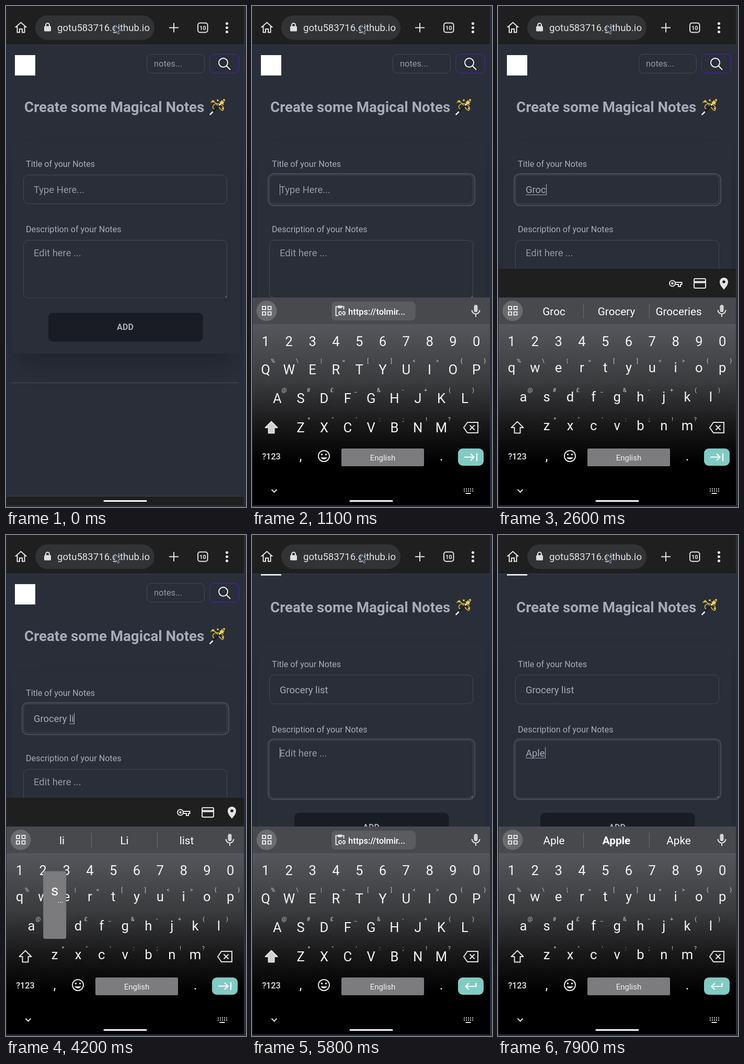
An HTML page that plays this animation: 459x959 px, repeating every 8000 ms.

```html
<!DOCTYPE html>
<html lang="en">
<head>
<meta charset="utf-8">
<title>Magical Notes</title>
<style>
html, body { margin: 0; width: 100%; height: 100%; overflow: hidden; background: #263040; }
svg { display: block; width: 459px; height: 959px; }
text { font-family: Roboto, "Noto Sans", sans-serif; white-space: pre; }
.mid { text-anchor: middle; }
.line { fill: none; stroke: #e4e4e4; stroke-width: 2; }
.box { fill: none; stroke: #434955; }
.ring { fill: none; stroke: #474d59; stroke-width: 2; }
.page text { fill: #a6abb8; }
.page .hint { fill: #9299a5; }
.label { font-size: 16.15px; }
.field { font-size: 18.4px; }
.keys { font-size: 25.6px; fill: #f2f2f2; text-anchor: middle; }
.alt { font-size: 11px; fill: #c9c9c9; text-anchor: end; }
.word { font-size: 20.7px; fill: #fff; text-anchor: middle; }
</style>
</head>
<body>
<svg viewBox="0 0 459 959">
  <defs>
    <linearGradient id="fade" gradientUnits="userSpaceOnUse" x1="0" y1="609" x2="0" y2="875">
      <stop offset="0" stop-color="#55575c"/>
      <stop offset=".42" stop-color="#3a3b3d"/>
      <stop offset=".72" stop-color="#19191a"/>
      <stop offset="1" stop-color="#000"/>
    </linearGradient>
    <filter id="blur" filterUnits="userSpaceOnUse" x="-80" y="180" width="620" height="640">
      <feGaussianBlur stdDeviation="27"/>
    </filter>
  </defs>

  <rect width="459" height="959" fill="#263040"/>
  <rect x="1" y="74" width="454" height="883" fill="#2a2e39"/>

  <g id="page" class="page">
    <rect x="17" y="94" width="39" height="39" fill="#fff"/>
    <rect class="box" x="269.5" y="92.5" width="110" height="36" rx="8.5"/>
    <text class="hint" x="283" y="116" font-size="16.4">notes...</text>
    <rect x="389.5" y="92.5" width="56" height="36" rx="8.5" fill="none" stroke="#561bc0"/>
    <g fill="none" stroke="#fff" stroke-width="1.8" stroke-linecap="round">
      <circle cx="415.5" cy="108.5" r="8.5"/><path d="M422 115l6.5 6.5"/>
    </g>
    <text x="35" y="203" font-size="27.7" font-weight="700">Create some Magical Notes</text>
    <g id="wand" fill="none" stroke-linecap="round">
      <path d="M392 185c3-6 9 0 14 7s9 11 10 5-8-11-14-10-9 8-4 10" stroke="#d9b52c" stroke-width="1.6"/>
      <path d="M391 207l21-21" stroke="#1d1d22" stroke-width="3.6"/>
      <path d="M390.5 207.500l4.500-4.500M408 189.500l3.500-3.500" stroke="#e8e8ec" stroke-width="2.800"/>
    </g>

    <rect x="24" y="305" width="409" height="375" fill="#000" opacity=".25" filter="url(#blur)"/>
    <rect x="10" y="262" width="437" height="403" rx="5" fill="#2a2e39"/>
    <text class="label" x="38" y="308">Title of your Notes</text>
    <rect class="box" x="33.5" y="323.5" width="389" height="55" rx="9"/>
    <rect class="ring" id="ring1" x="31" y="321" width="395" height="61" rx="11"/>
    <text class="label" x="38" y="433">Description of your Notes</text>
    <rect class="box" x="33.500" y="448.5" width="389" height="110.5" rx="9"/>
    <rect class="ring" id="ring2" x="31" y="446" width="395" height="115.500" rx="11"/>
    <path d="M420 558l2-2" stroke="#c9ccd2"/>
    <text class="field" id="title" x="53" y="358"></text>
    <text class="field" id="desc" x="53" y="479"></text>
    <path id="caret" stroke="#b4b9c4"/>
    <path id="under" stroke="#a6abb8"/>
    <rect x="81" y="587" width="295.500" height="55.500" rx="9" fill="#191c24"/>
    <text class="mid" x="228" y="620" font-size="16.2" font-weight="700">ADD</text>
    <rect x="10" y="720" width="436" height="2.5" fill="#383c47"/>
  </g>

  <rect id="shade" x="1" width="454" height="460" fill="#1f1f1f"/>
  <g id="autofill" class="line">
    <circle cx="333.500" cy="531" r="5.500"/><circle cx="333.500" cy="531" r="1.300"/>
    <path d="M339 529h12.500v4h-2.500v4h-4v-4h-6"/>
    <rect x="375" y="522" width="22" height="18" rx="2"/><path d="M375 528.500h22" stroke-width="4"/>
    <path d="M432 543c-5-6-8-10-8-15a8 8 0 0 1 16 0c0 5-3 9-8 15z" fill="#e4e4e4" stroke="none"/>
    <circle cx="432" cy="528" r="2.800" fill="#1f1f1f" stroke="none"/>
  </g>

  <g id="board">
    <rect x="1" y="558" width="454" height="52" fill="#48494d"/>
    <rect x="1" y="609" width="454" height="350" fill="url(#fade)"/>
    <circle cx="28" cy="583.500" r="19.500" fill="#6a6b6e"/>
    <path class="line" stroke-width="1.800" d="M20 575h6v6h-6zM30.500 575h6v6h-6zM20 585.500h6v6h-6zM30.500 585.500h6v6h-6z"/>
    <rect x="424.500" y="572" width="7" height="14" rx="3.500" fill="#d4d4d4"/>
    <path class="line" d="M420.500 582a7.500 7.500 0 0 0 15 0M428 590v5"/>
    <g id="chip">
      <rect x="152" y="566" width="161" height="36" rx="8" fill="#5b5c60"/>
      <path class="line" d="M165 592.500h-4.500v-17h15v5.500"/>
      <path d="M164 573.500h8v5h-8z" fill="#e4e4e4"/>
      <path class="line" d="M171 585h-2a3 3 0 0 0 0 6h2m2.500-6h1.500a3 3 0 0 1 0 6h-1.500M170 588h5" stroke-width="1.800"/>
      <text x="184" y="591" font-size="16.5" font-weight="500" fill="#fff">https://tolmir...</text>
    </g>
    <g id="bar">
      <path d="M163.500 570v28M289.500 570v28" stroke="#6f7073"/>
      <text class="word" x="107" y="592"></text>
      <text class="word" x="226.500" y="592"></text>
      <text class="word" x="345.500" y="592"></text>
    </g>
    <g id="keys" class="keys"></g>
    <path id="shift" class="line" d="M37 795.500l11.500 11.500h-6v10.500h-11v-10.500h-6z" stroke-linejoin="round"/>
    <path class="line" d="M405 807l7-10h20v20h-20zM416.500 802.500l9 9m0-9l-9 9"/>
    <text class="mid" x="37" y="868" font-size="16.300" font-weight="500" fill="#e4e4e4">?123</text>
    <text class="keys" x="93" y="870">,</text>
    <text class="keys" x="362" y="870">.</text>
    <circle class="line" cx="137.500" cy="861.500" r="10.500"/>
    <circle cx="133.500" cy="858.500" r="1.700" fill="#e4e4e4"/><circle cx="141.500" cy="858.500" r="1.700" fill="#e4e4e4"/>
    <path d="M131.500 864h12c-2 5-10 5-12 0z" fill="#e4e4e4"/>
    <rect x="171" y="847" width="158" height="34" rx="2.500" fill="#7c7c7e"/>
    <text class="mid" x="250" y="870" font-size="15" fill="#f0f0f0">English</text>
    <rect x="394" y="847" width="49" height="33" rx="9" fill="#80cbc4"/>
    <g fill="none" stroke="#fff" stroke-width="2.200">
      <path id="next" d="M406 863.500h18.500m-6.500-6.500l6.500 6.500-6.500 6.500M430 856v15"/>
      <path id="enter" d="M428.500 857.500v6.500h-20m6-6l-6 6 6 6"/>
    </g>
    <path class="line" d="M37.500 925.500l5 5 5-5"/>
    <g stroke="#e4e4e4" stroke-width="2">
      <path d="M405 924.500h18M405 928.500h18" stroke-dasharray="2 2"/><path d="M408.500 933h10"/>
    </g>
  </g>
  <g id="pop">
    <rect x="-22" width="44" height="129.500" rx="4" fill="#7b7b7d"/>
    <text class="mid" y="46" font-size="28" fill="#fff"></text>
    <text class="mid" x="11" y="60" font-size="14" fill="#fff">...</text>
  </g>

  <rect x="1" width="454" height="74" fill="#1f1f1f"/>
  <path d="M1 74.500h454" stroke="#3a3e47"/>
  <path class="line" d="M21.500 50.500v-10.500h-2.500l9.500-8.500 9.500 8.500h-2.500v10.500h-4.500v-6.500h-5v6.500z"/>
  <rect x="56" y="18" width="228" height="47" rx="23.500" fill="#323335"/>
  <rect x="73" y="38.500" width="13" height="10" rx="1.500" fill="#dedede"/>
  <path class="line" d="M76 39v-2.500a3.500 3.500 0 0 1 7 0v2.500"/>
  <text x="98" y="48" font-size="18.600" fill="#e2e2e2">gotu583716.github.io</text>
  <path d="M208 36.500v15l3.500-2.800 2.500 5.300 2.700-1.300-2.400-5 4.700-.7z" fill="#2c3748" stroke="#aab4c2"/>
  <path class="line" d="M312 41.500h18M321 32.500v18" stroke-width="2.400"/>
  <rect class="line" x="367" y="32.500" width="18.500" height="18" rx="4"/>
  <text class="mid" x="376.300" y="45.500" font-size="11" font-weight="700" fill="#e4e4e4">10</text>
  <path d="M422.500 33.500v0M422.500 41.500v0M422.500 49.500v0" stroke="#e4e4e4" stroke-width="5.200" stroke-linecap="round"/>

  <path id="edge" d="M1 938.500h454" stroke="#3a3e47"/>
  <rect x="186.500" y="946" width="83" height="3" rx="1.500" fill="#fff"/>
  <path d="M0 0h1v959h-1zM455 0h4v959h-4zM0 956h459v3h-459z" fill="#263040"/>
</svg>

<script>
const $ = id => document.getElementById(id);
const LOOP = 8000, PITCH = 44.8;
const FOCUS = 200, SLIDE = 600, SETTLED = 1000, AUTOFILL = 1200, NEXT = 5200, PLAIN = 5300;
const HOLD = 100;

const ROWS = [
  { chars: "1234567890", x: 26, y: 651 },
  { chars: "qwertyuiop", alts: "%\\|=[]<>{}", x: 26, y: 701 },
  { chars: "asdfghjkl", alts: "@#£_&-+()", x: 48.4, y: 756.5 },
  { chars: "zxcvbnm", alts: "*\"':;!?", x: 93.2, y: 812 }
];

// press time, character, whether a key preview shows
const TITLE = [[1800, "G", 1], [2000, "r", 1], [2200, "o", 1], [2300, "c", 0], [2700, "e", 1], [3000, "r", 1],
  [3300, "y", 1], [3500, " ", 0], [3700, "l", 1], [3900, "i", 1], [4200, "s", 1], [4300, "t", 1]];
const DESC = [[6300, "A", 1], [6900, "p", 1], [7200, "l", 1], [7500, "e", 1]];

const WORDS = {
  G: "G Good Go", Gr: "Gr Great Grand", Gro: "Gro Group Grow", Groc: "Groc Grocery Groceries",
  Groce: "Groce Grocery Groceries", Grocer: "Grocer Grocery Groceries", Grocery: "Grocery Groceries Grocer",
  "": "list store shopping", l: "l like look", li: "li Li list", lis: "lis list Lis", list: "list List lists",
  A: "A And All", Ap: "Ap App Apple", Apl: "Apl Apple Apply", Aple: "Aple Apple Apke"
};

const svgEl = (name, attrs, text = "") => {
  const el = document.createElementNS("http://www.w3.org/2000/svg", name);
  for (const k in attrs) el.setAttribute(k, attrs[k]);
  el.textContent = text;
  return el;
};
const set = (el, attrs) => { for (const k in attrs) el.setAttribute(k, attrs[k]); };
const show = (el, on) => { el.style.display = on ? "" : "none"; };

const letters = [], spots = {};
ROWS.forEach((row, r) => [...row.chars].forEach((c, i) => {
  const x = row.x + i * PITCH;
  const el = svgEl("text", { x, y: row.y }, c);
  $("keys").append(el);
  if (!r) return;
  letters.push({ el, c, y: row.y });
  spots[c] = { x, y: 587.5 + (r - 1) * 56 };
  $("keys").append(svgEl("text", { class: "alt", x: x + 18, y: 683 + (r - 1) * 56 }, row.alts[i]));
}));

// stars around the wand: x, y, radius
[[396, 182.5, 3.2], [413, 185, 5.5], [405, 180.5, 2.6], [417, 180, 2.8], [414.5, 196, 2.4]].forEach(([x, y, r]) => {
  let d = "";
  for (let i = 0; i < 10; i++) {
    const a = Math.PI * i / 5 - Math.PI / 2, q = i % 2 ? r / 2 : r;
    d += (i ? "L" : "M") + (x + q * Math.cos(a)).toFixed(2) + " " + (y + q * Math.sin(a)).toFixed(2);
  }
  $("wand").append(svgEl("path", { d: d + "z", fill: "#fbd43c" }));
});

const ctx = document.createElement("canvas").getContext("2d");
ctx.font = '18.4px Roboto, "Noto Sans", sans-serif';
const width = s => ctx.measureText(s).width;
const typed = (keys, t) => keys.filter(k => t >= k[0] + HOLD).map(k => k[1]).join("");
const within = (t, a, b) => t >= a && t < b;

function fill(el, text, hint) {
  el.textContent = text || hint;
  el.setAttribute("class", text ? "field" : "field hint");
}

function draw(t) {
  const inDesc = t >= NEXT, focused = t >= FOCUS;
  const title = typed(TITLE, t), desc = typed(DESC, t);
  fill($("title"), title, "Type Here...");
  fill($("desc"), desc, "Edit here ...");
  show($("ring1"), focused && !inDesc);
  show($("ring2"), inDesc);

  const p = Math.min(1, Math.max(0, (t - NEXT) / 300));
  set($("page"), { transform: `translate(0 ${-55.5 * p * p * (3 - 2 * p)})` });

  const text = inDesc ? desc : title, base = inDesc ? 479 : 358;
  const word = text.split(" ").pop(), end = 53 + width(text);
  show($("caret"), focused);
  set($("caret"), { d: `M${Math.round(end) + .5} ${base - 17}v21` });
  show($("under"), word);
  set($("under"), { d: `M${end - width(word)} ${base + 3.5}H${end}` });

  const open = t >= SLIDE, auto = within(t, AUTOFILL, PLAIN);
  set($("shade"), { y: !open ? 938 : auto ? 503 : 558 });
  show($("edge"), !open);
  show($("autofill"), auto);
  show($("board"), open);
  const left = Math.max(0, 1 - (t - SLIDE) / (SETTLED - SLIDE));
  set($("board"), { transform: `translate(0 ${400 * Math.pow(left, 1.32)})` });

  const upper = t < AUTOFILL || within(t, 1700, 1900) || within(t, 5400, 6400);
  for (const { el, c, y } of letters) {
    el.textContent = upper ? c.toUpperCase() : c;
    el.setAttribute("y", upper ? y + 3.5 : y);
  }
  $("shift").style.fill = upper ? "#d0d0d0" : "none";
  show($("next"), !inDesc);
  show($("enter"), inDesc);

  const chip = !text;
  show($("chip"), chip);
  show($("bar"), !chip);
  const list = WORDS[word].split(" ");
  $("bar").querySelectorAll("text").forEach((el, i) => {
    el.textContent = list[i];
    el.style.fontWeight = i === 1 && word.startsWith("Ap") ? 700 : 400;
  });

  const key = [...TITLE, ...DESC].find(k => k[2] && within(t, k[0], k[0] + HOLD));
  show($("pop"), key);
  if (key) {
    const { x, y } = spots[key[1].toLowerCase()];
    set($("pop"), { transform: `translate(${x} ${y})` });
    $("pop").querySelector("text").textContent = key[1];
  }
}

const start = performance.now();
function tick() {
  draw((performance.now() - start) % LOOP);
  requestAnimationFrame(tick);
}
tick();
</script>
</body>
</html>
```
